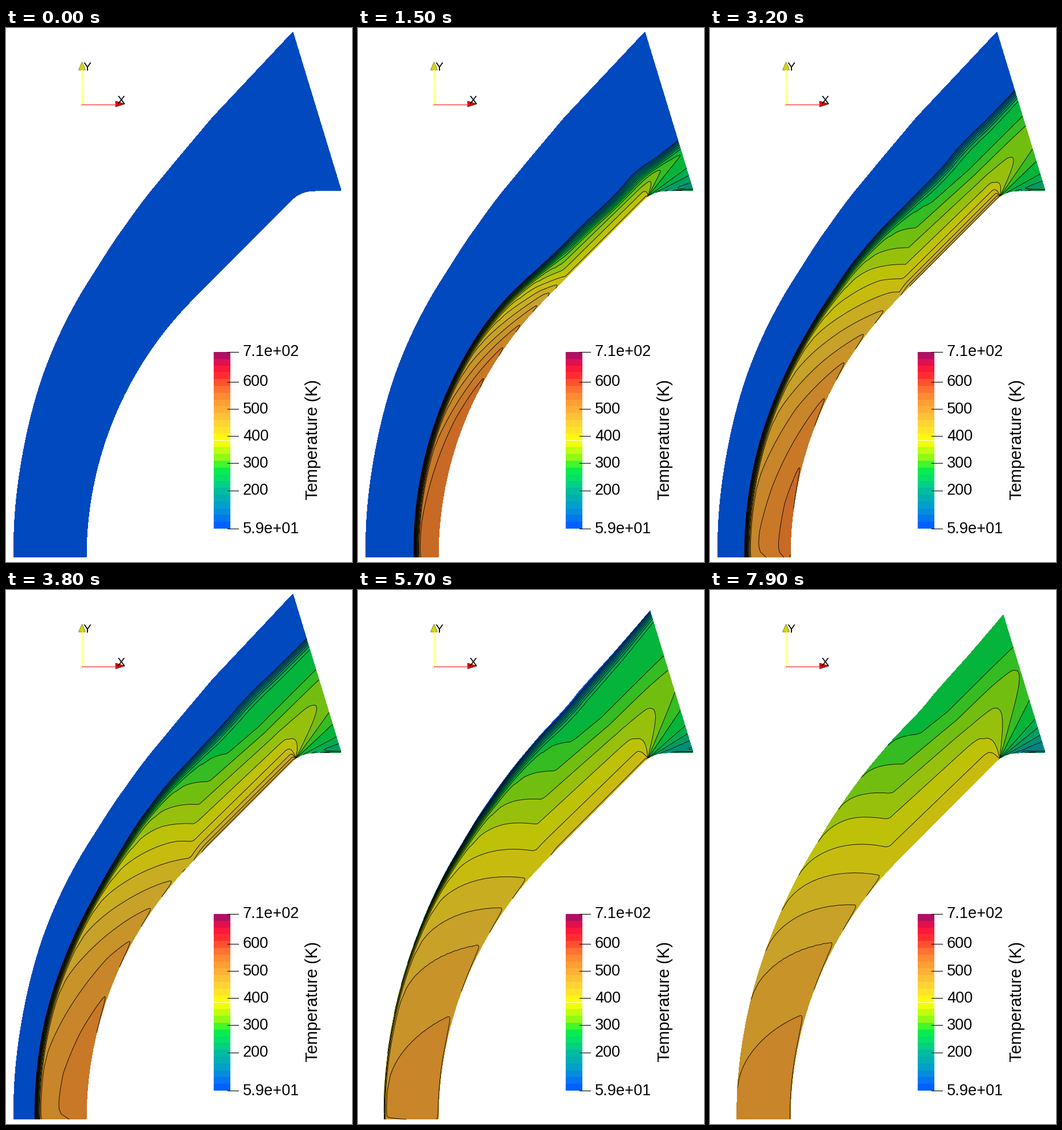
A matplotlib script that plays this animation: 603 px wide and 928 px high, repeating every 8000 ms.

```python
import numpy as np
import matplotlib.pyplot as plt
from matplotlib.animation import FuncAnimation
from matplotlib.patches import Polygon, Rectangle

W, H, DPI = 603, 928, 64  # a power of two keeps the pixel size exact
FRAMES, STEP = 80, 100
PX = 72 / DPI
BANDS = 26

plt.rcParams["font.family"] = "Liberation Sans"
fig = plt.figure(figsize=(W / DPI, H / DPI), dpi=DPI, facecolor="white")
ax = fig.add_axes([0, 0, 1, 1])
ax.set_xlim(0, W)
ax.set_ylim(H, 0)
ax.axis("off")

# ---- colour map: (band, r, g, b)
STOPS = np.array([
    (0, 0, 96, 255), (2, 5, 140, 225), (3, 0, 160, 200), (5, 0, 188, 160),
    (7, 5, 225, 105), (8, 7, 237, 79), (9, 66, 247, 45), (10, 145, 250, 21),
    (11, 192, 253, 16), (12, 241, 255, 10), (13, 255, 246, 20),
    (14, 255, 228, 42), (15, 255, 212, 54), (17, 255, 175, 54),
    (19, 255, 140, 50), (20, 255, 115, 50), (21, 255, 80, 48),
    (22, 255, 45, 50), (23, 250, 25, 60), (24, 225, 15, 75), (25, 175, 16, 100),
])
BAR = np.stack([np.interp(np.arange(BANDS), STOPS[:, 0], STOPS[:, c])
                for c in (1, 2, 3)], axis=1) / 255
BODY = BAR * np.array([0.785, 0.76, 0.75])


def curve(x, xs, ys):
    """Smooth cubic through the points (xs, ys); ys may hold rows."""
    xs, ys = np.asarray(xs, float), np.asarray(ys, float)
    m = np.gradient(ys, xs, axis=0)
    i = np.clip(np.searchsorted(xs, x) - 1, 0, len(xs) - 2)
    h = xs[i + 1] - xs[i]
    u = (x - xs[i]) / h
    return ((1 + 2 * u) * (1 - u) ** 2 * ys[i] + u * (1 - u) ** 2 * h * m[i]
            + u * u * (3 - 2 * u) * ys[i + 1] + u * u * (u - 1) * h * m[i + 1])


# ---- geometry: s is the length along the wall
R, NOSE, LINE, FILLET, END = 635, 498.7, 745, 785, 829
s = np.concatenate([np.linspace(0, LINE, 90), np.linspace(LINE, END, 40)[1:]])


def wall():
    a = np.clip(s / R, 0, np.pi / 4)
    run = np.clip(s - NOSE, 0, LINE - NOSE) / np.sqrt(2)
    x = 775 - R * np.cos(a) + run
    y = 920 - R * np.sin(a) - run
    q = np.clip((s - LINE) / (FILLET - LINE), 0, 1)
    f = np.clip((s - FILLET) / (END - FILLET), 0, 1)
    turn = s > LINE
    bx = (1 - q) ** 2 * 500 + 2 * q * (1 - q) * 514 + q * q * 540 + 44 * f
    by = (1 - q) ** 2 * 297 + 2 * q * (1 - q) * 283 + q * q * 283 - f
    return np.where(turn, bx, x), np.where(turn, by, y), a


KNOTS = np.array([0, 150, 290, 380, 440, 492, 560, 630, 745, 829])
OUTER = np.array([126, 132, 145, 154, 161, 171, 182, 189, 199, 287])
FITTED = np.array([93, 97, 106, 116.5, 125, 136, 147, 153.5, 159, 249])

bx, by, ang = wall()
reach = curve(np.minimum(s, LINE), KNOTS[:-1], OUTER[:-1])
ox, oy = bx - reach * np.cos(ang), by - reach * np.sin(ang)
fan = np.clip((s - LINE) / (END - LINE), 0, 1)
edge = np.argmin(abs(s - LINE))
ox = np.where(s > LINE, ox[edge] + (500 - ox[edge]) * fan, ox)
oy = np.where(s > LINE, oy[edge] + (7 - oy[edge]) * fan, oy)
length = np.hypot(ox - bx, oy - by)
fitted = curve(s, KNOTS, FITTED / OUTER)
width = np.interp(s, [0, 350, 600, END], [13, 13, 22, 28])

# ---- distance of the shock from the wall at each knot over time
SHOCK_T = [0, 1.5, 2.6, 3.8, 4.9, 5.7, 6.5, 8]
LAST = [110, 115, 124, 134, 144, 157, 170, 178, 186, 285]
SHOCK = np.array([
    [0] * 10,
    [43, 46, 49, 51, 51, 49, 46, 46, 46, 92],
    [68, 69, 71, 74, 76, 80, 82, 81, 83, 155],
    [90, 93, 95, 100, 108, 118, 127, 130, 136, 208],
    [100, 104, 107, 113, 122, 132, 142, 146, 152, 250],
    [102, 106, 114, 122, 130, 140, 152, 159, 165, 258],
    LAST, LAST])

# ---- post-shock level (in bands) along the shock and around the shoulder
SIDE_S = [-140, 0, 52, 184, 259, 324, 381, 437, 491, 557, 629, 700]
SIDE_U = [17.5, 17.3, 17, 16, 15, 14, 13, 12, 11, 10, 9, 8]
FAN_A = [-90, -60, -40, -8.6, 7, 16, 27, 42, 51, 60, 68, 80]
FAN_U = [20, 15, 13, 12, 11, 10, 9, 8, 7, 6, 5, 4]
PHASES = [0, 1.5, 2.6, 3.8, 4.9, 5.7, 7.9]


def phase(t, *values):
    return np.interp(t, PHASES, values)


def grid(t):
    """Lines across the layer, dense at the wall and inside the shock."""
    row = curve(t, SHOCK_T, SHOCK) / OUTER
    front = np.clip(curve(s, KNOTS, row), 1e-4, 1)
    back = np.maximum(front - width / length, 0.45 * front)
    ts = [4.55, 4.9, 5.4, 5.7, 6.3, 7.9]
    low = np.interp(t, ts, [0, 0.27, 0.82, 0.955, 0.97, 1])
    top = np.interp(t, ts, [0, 0.22, 0.70, 0.81, 1, 1])
    rim = 1 - (low + (top - low) * s / END) * (1 - fitted)
    r = np.linspace(0, 1, 45)[:, None] ** 1.4
    c = np.linspace(0, 1, 28)[1:, None]
    o = np.array([[0.5], [1]])
    eta = np.vstack([back * r, back + (front - back) * c, front + (1 - front) * o])
    return np.minimum(eta, rim), front, back, rim


def levels(t):
    eta, front, back, rim = grid(t)
    x, y = bx + eta * (ox - bx), by + eta * (oy - by)
    if t == 0:
        return x, y, np.zeros_like(x)
    d = eta * length
    xi = np.clip(eta / np.minimum(back, rim), 0, 1)
    scale = min((np.minimum(back, rim) * length)[edge - 8] / 156, 1)

    # nose flow, hotter while the shock is still moving out
    lag = 140 * (0.5 + 0.5 * scale) * (1 - xi) ** 0.55
    nose = np.interp(s - lag, SIDE_S, SIDE_U)
    at_shock = phase(t, 5, 2.5, 0.8, 0.3, 0, 0, 0)
    at_wall = phase(t, 8, 6, 3.8, 1.9, 0.1, 0.05, 0)
    fade = (1 - s / 1300) * np.clip((620 - s) / 120, 0, 1)
    nose = nose + fade * (at_shock + (at_wall - at_shock) * (1 - xi) ** 1.3)
    nose = nose - 0.7 * np.exp(-d / 1.5)
    nose = nose - phase(t, 0.5, 0.5, 0.5, 0.5, 0.4, 0.4, 0) * np.exp(-s / 7)

    # straight flank: levels run parallel to the wall
    off = np.maximum(797 - x - y, 0) / np.sqrt(2)
    foot = NOSE + (x - y + 145) / np.sqrt(2)
    span = (145 - 25 * np.clip((foot - 520) / 225, 0, 1)) * scale
    flank = (phase(t, 12.9, 12.9, 12.7, 13.5, 13.5, 13.5, 13.5)
             - phase(t, 1.5, 1.5, 2.8, 4.4, 4.4, 4.4, 4.4) * (off / span) ** 1.3)
    hot = phase(t, 0, 0.3, 3, 3, 0.8, 0.7, 0.1)
    flank = flank + hot * np.exp(-d / 9) * np.clip((s - 470) / 60, 0, 1)
    u = np.maximum(np.maximum(nose, flank), 8.4)

    # expansion around the shoulder
    a = np.degrees(np.arctan2(x - 505, 293 - y))
    turn = np.interp(a - phase(t, 10, 12, 18, 20, 8, 7, 0), FAN_A, FAN_U)
    u = -np.logaddexp(-1.2 * u, -1.2 * turn) / 1.2
    u = u + 3 * np.exp(-d / 2) * np.clip((s - 785) / 15, 0, 1)

    depth = np.clip((front - eta) / (front - back), 0, 1)
    return x, y, np.clip(u, 0, 25.9) * (1 - (1 - depth) ** 2)


def legend():
    x0, x1, y0, y1 = 362, 391, 563, 870
    h = (y1 - y0) / BANDS
    for k, c in enumerate(BAR):
        ax.add_patch(Rectangle((x0, y1 - (k + 1) * h), x1 - x0, h, fc=c, lw=0, aa=False))
    for v, name in [(710, "7.1e+02"), (600, "600"), (500, "500"), (400, "400"),
                    (300, "300"), (200, "200"), (59, "5.9e+01")]:
        y = y0 + (710 - v) / 651 * (y1 - y0)
        ax.plot([386, 404.5], [y, y], color="black", lw=1.1 * PX)
        ax.text(413, y + 7.5, name, fontsize=27 * PX, va="baseline")
    ax.text(535, 715.5, "Temperature (K)", fontsize=29 * PX, rotation=90,
            ha="center", va="center")


def axes_mark():
    ax.plot([132.5, 132.5], [132, 72], color="#ffff30", lw=1.3 * PX)
    ax.plot([132, 192], [132.5, 132.5], color="#ff3030", lw=1.3 * PX)
    ax.add_patch(Polygon([(132.5, 59), (126.5, 73), (138.5, 73)], fc="#d8d414",
                         ec="#6b6a10", lw=0.7 * PX))
    ax.add_patch(Polygon([(207, 132), (191, 127), (191, 137)], fc="#dc0a0a",
                         ec="#5a0808", lw=0.7 * PX))
    ax.text(142, 73.5, "Y", fontsize=21 * PX, ha="center", va="baseline")
    ax.text(201, 132.5, "X", fontsize=21 * PX, ha="center", va="baseline")


legend()
axes_mark()
drawn = []


def update(i):
    while drawn:
        drawn.pop().remove()
    x, y, u = levels(i * STEP / 1000)
    drawn.append(ax.contourf(x, y, u, levels=[-1, *range(1, BANDS + 1)], colors=BODY, zorder=1))
    if u.max() > 1:
        drawn.append(ax.contour(x, y, u, levels=range(1, BANDS), colors="black",
                                linewidths=0.85 * PX, zorder=2))
    ax.set_xlim(0, W)
    ax.set_ylim(H, 0)
    return drawn


anim = FuncAnimation(fig, update, frames=FRAMES, interval=STEP, repeat=True,
                     repeat_delay=0, blit=False)
plt.show()
```
